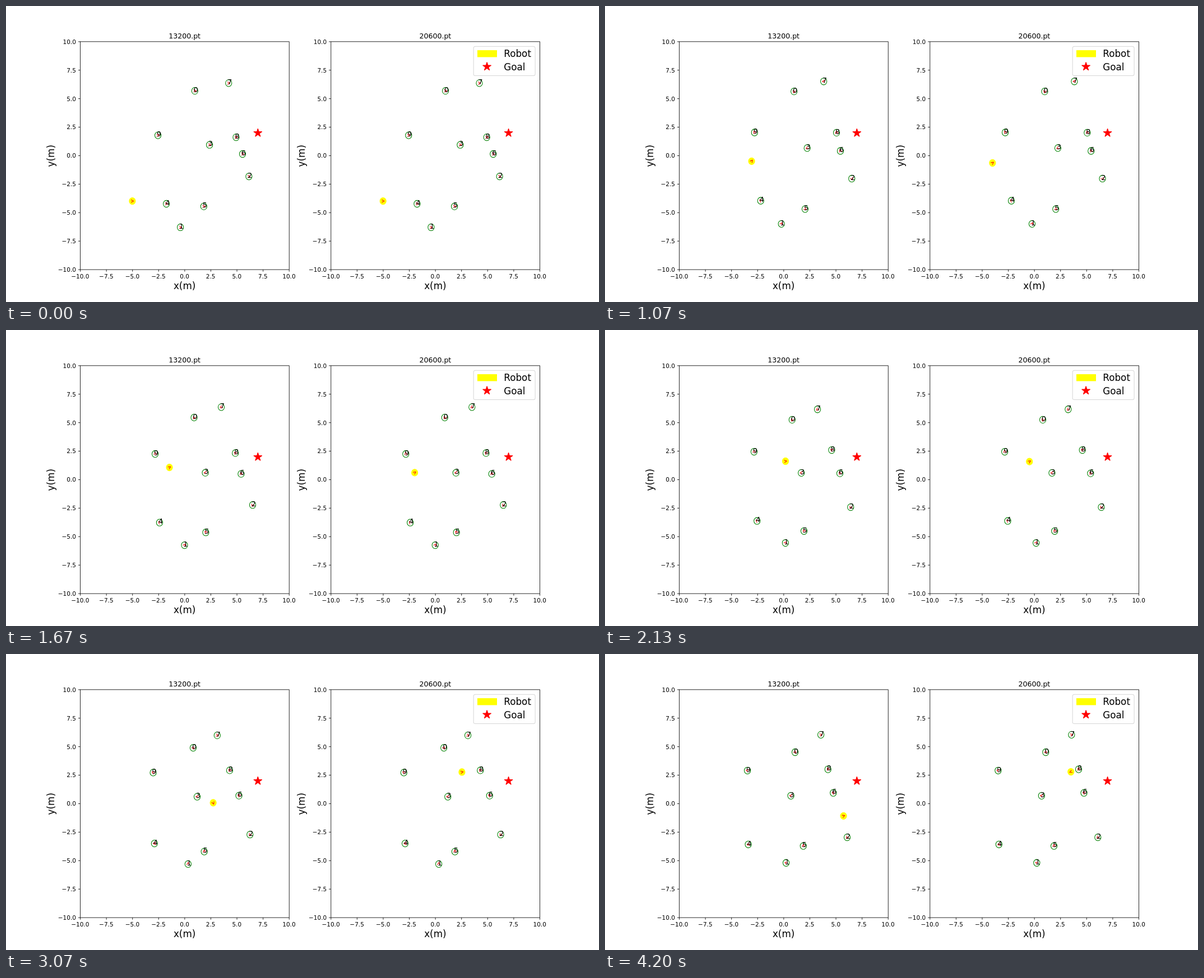
An HTML page that plays this animation: 1058 by 529 pixels, repeating every 4.27 s.

```html
<!DOCTYPE html>
<html lang="en">
<head>
<meta charset="utf-8">
<title>Robot navigation</title>
<style>
  html, body { margin: 0; width: 100%; height: 100%; overflow: hidden; background: #fff; }
  svg { display: block; width: 100vw; height: 100vh; }
  text { font-family: "DejaVu Sans", sans-serif; fill: #000; }
</style>
</head>
<body>
<svg id="stage" viewBox="0 0 1058 529"></svg>
<script>
const PT = 1.0496;                 // pixels per point
const LOOP = 4270;
const LAST_STEP = 63;
const AXES = { left: 132.25, top: 63.48, width: 372.7, height: 407.33 };
const PANEL_STEP = 447.25;
const UX = AXES.width / 20, UY = AXES.height / 20;
const RADIUS = 0.3;
const toX = x => AXES.left + (x + 10) * UX;
const toY = y => AXES.top + (10 - y) * UY;

// Waypoints of the pedestrians, passed at these steps
const WALK_STEPS = [0, 16, 39, LAST_STEP];
const WALKS = [
  [[.98, 5.67], [1, 5.62], [.78, 5.05], [1.1, 4.5]],
  [[-.4, -6.3], [-.21, -6], [.3, -5.41], [.24, -5.21]],
  [[6.16, -1.84], [6.53, -2.03], [6.33, -2.6], [6.09, -2.97]],
  [[2.39, .93], [2.26, .65], [1.43, .58], [.7, .68]],
  [[-1.74, -4.24], [-2.19, -3.97], [-2.7, -3.54], [-3.38, -3.59]],
  [[1.84, -4.47], [2.06, -4.7], [1.9, -4.38], [1.89, -3.73]],
  [[5.55, .13], [5.44, .4], [5.33, .6], [4.76, .93]],
  [[4.22, 6.35], [3.84, 6.5], [3.1, 6.02], [3.57, 6.03]],
  [[4.93, 1.6], [5.07, 2], [4.41, 2.79], [4.25, 3]],
  [[-2.55, 1.77], [-2.78, 2.02], [-2.88, 2.6], [-3.46, 2.89]]
];

// Each robot turns at its own steps
const ROBOTS = [
  { steps: [0, 16, 25, 39, 54, LAST_STEP],
    points: [[-5, -4], [-3.06, -.5], [-1.45, 1.06], [1.77, 1.46], [3.82, -1.47], [5.74, -1.09]] },
  { steps: [0, 7, 25, 39, 54, LAST_STEP],
    points: [[-5, -4], [-5.24, -2.28], [-1.97, .6], [1.04, 2.34], [3.73, 2.92], [3.51, 2.78]] }
];

// Smooth curve through values y at times t; inner slopes weigh both neighbouring spans
function spline(t, y) {
  const end = t.length - 1;
  const chord = i => (y[i + 1] - y[i]) / (t[i + 1] - t[i]);
  const slope = i => {
    if (i === 0) return 1.5 * chord(0) - .5 * slope(1);
    if (i === end) return 1.5 * chord(end - 1) - .5 * slope(end - 1);
    const before = t[i] - t[i - 1], after = t[i + 1] - t[i];
    return (after * chord(i - 1) + before * chord(i)) / (before + after);
  };
  const slopes = t.map((_, i) => slope(i));
  return step => {
    let i = 0;
    while (i < end - 1 && step >= t[i + 1]) i++;
    const span = t[i + 1] - t[i], u = (step - t[i]) / span, w = 1 - u;
    return (1 + 2 * u) * w * w * y[i] + u * w * w * span * slopes[i] +
      u * u * (3 - 2 * u) * y[i + 1] - u * u * w * span * slopes[i + 1];
  };
}

function makePath(steps, points) {
  const x = spline(steps, points.map(p => p[0]));
  const y = spline(steps, points.map(p => p[1]));
  // Everyone starts facing right, then faces along the path
  const heading = k => k === 0 ? 0 : Math.atan2(y(k) - y(k - .05), x(k) - x(k - .05));
  return step => ({ x: x(step), y: y(step), heading: heading(step) });
}
const walkPaths = WALKS.map(points => makePath(WALK_STEPS, points));
const robotPaths = ROBOTS.map(({ steps, points }) => makePath(steps, points));

const stage = document.getElementById("stage");
function add(parent, tag, attrs = {}, content) {
  const node = document.createElementNS("http://www.w3.org/2000/svg", tag);
  for (const name in attrs) node.setAttribute(name, attrs[name]);
  if (content !== undefined) node.textContent = content;
  parent.appendChild(node);
  return node;
}
function label(parent, content, x, y, points, anchor = "middle") {
  return add(parent, "text", { x, y, "font-size": points * PT, "text-anchor": anchor }, content);
}

function star(parent, x, y) {
  const points = Array.from({ length: 10 }, (_, i) => {
    const r = 7.5 * PT * (i % 2 ? .381966 : 1), a = i * Math.PI / 5;
    return `${x + r * Math.sin(a)},${y - r * Math.cos(a)}`;
  });
  add(parent, "polygon", { points: points.join(" "), fill: "red", stroke: "red",
    "stroke-width": PT, "stroke-linejoin": "bevel" });
}

function drawAxes(panel, title) {
  const { left, top, width, height } = AXES, snap = .3;
  const bottom = top + height, middle = left + width / 2;
  const line = { fill: "none", stroke: "#000", "stroke-width": .8 * PT };
  add(panel, "rect", { x: left + snap, y: top + snap, width, height, ...line });
  let ticks = "";
  for (let v = -10; v <= 10; v += 2.5) {
    const name = v.toFixed(1).replace("-", "\u2212");
    ticks += `M${toX(v) + snap} ${bottom + snap}v${3.5 * PT}M${left + snap} ${toY(v) + snap}h${-3.5 * PT}`;
    label(panel, name, toX(v), 486.8, 10);
    label(panel, name, left - 7 * PT, toY(v) + 4.2, 10, "end");
  }
  add(panel, "path", { d: ticks, ...line });
  label(panel, title, middle, 57.6, 12);
  label(panel, "x(m)", middle, 505.5, 16);
  label(panel, "y(m)", 0, 0, 16).setAttribute("transform", `translate(86 ${top + height / 2 + .6}) rotate(-90)`);
}

function drawLegend() {
  add(stage, "rect", { x: 834.2, y: 72.2, width: 109.9, height: 52.4, rx: 3.4, fill: "#fff", "fill-opacity": .8,
    stroke: "#ccc", "stroke-opacity": .8, "stroke-width": PT });
  add(stage, "rect", { x: 841, y: 79, width: 35, height: 12.4, fill: "#ff0" });
  star(stage, 858.1, 108.4);
  label(stage, "Robot", 888.3, 91.4, 16, "start");
  label(stage, "Goal", 888.3, 115, 16, "start");
}

function makeAgent(shapes, names, path, paint, name = "") {
  const body = add(shapes, "g");
  add(body, "ellipse", { rx: RADIUS * UX, ry: RADIUS * UY, "stroke-width": PT, ...paint });
  const arrow = add(body, "path", { d: `M${-4 * PT} ${-2 * PT}L0 0L${-4 * PT} ${2 * PT}`, fill: "none",
    stroke: "red", "stroke-width": PT, "stroke-linecap": "round", "stroke-linejoin": "round" });
  const text = label(names, name, -.11 * UX, .11 * UY, 12, "start");
  return step => {
    const { x, y, heading } = path(step);
    const move = `translate(${toX(x)} ${toY(y)})`;
    body.setAttribute("transform", move);
    text.setAttribute("transform", move);
    const dx = RADIUS * UX * Math.cos(heading), dy = -RADIUS * UY * Math.sin(heading);
    const tip = Math.hypot(dx, dy) - 3.12 * PT;
    arrow.setAttribute("transform", `rotate(${Math.atan2(dy, dx) * 180 / Math.PI}) translate(${tip} 0)`);
  };
}

const agents = ["13200.pt", "20600.pt"].flatMap((title, i) => {
  const panel = add(stage, "g", { transform: `translate(${i * PANEL_STEP} 0)` });
  const shapes = add(panel, "g");
  star(panel, toX(7) + .3, toY(2) + .5);
  drawAxes(panel, title);
  const names = add(panel, "g");
  return [
    makeAgent(shapes, names, robotPaths[i], { fill: "#ff0", stroke: "#ff0" }),
    ...walkPaths.map((path, n) => makeAgent(shapes, names, path, { fill: "none", stroke: "#008000" }, n))
  ];
});
drawLegend();

// 15 steps per second, each start rounded to 10 ms
const stepStart = k => Math.round(k * 100 / 15) * 10;
function stepAt(time) {
  const k = Math.floor((time + 5) * .015);
  return Math.min(LAST_STEP, stepStart(k) > time ? k - 1 : k);
}

const begin = performance.now();
let shown = -1;
function tick() {
  const step = stepAt((performance.now() - begin) % LOOP);
  if (step !== shown) {
    shown = step;
    agents.forEach(place => place(step));
  }
  requestAnimationFrame(tick);
}
tick();
</script>
</body>
</html>
```
